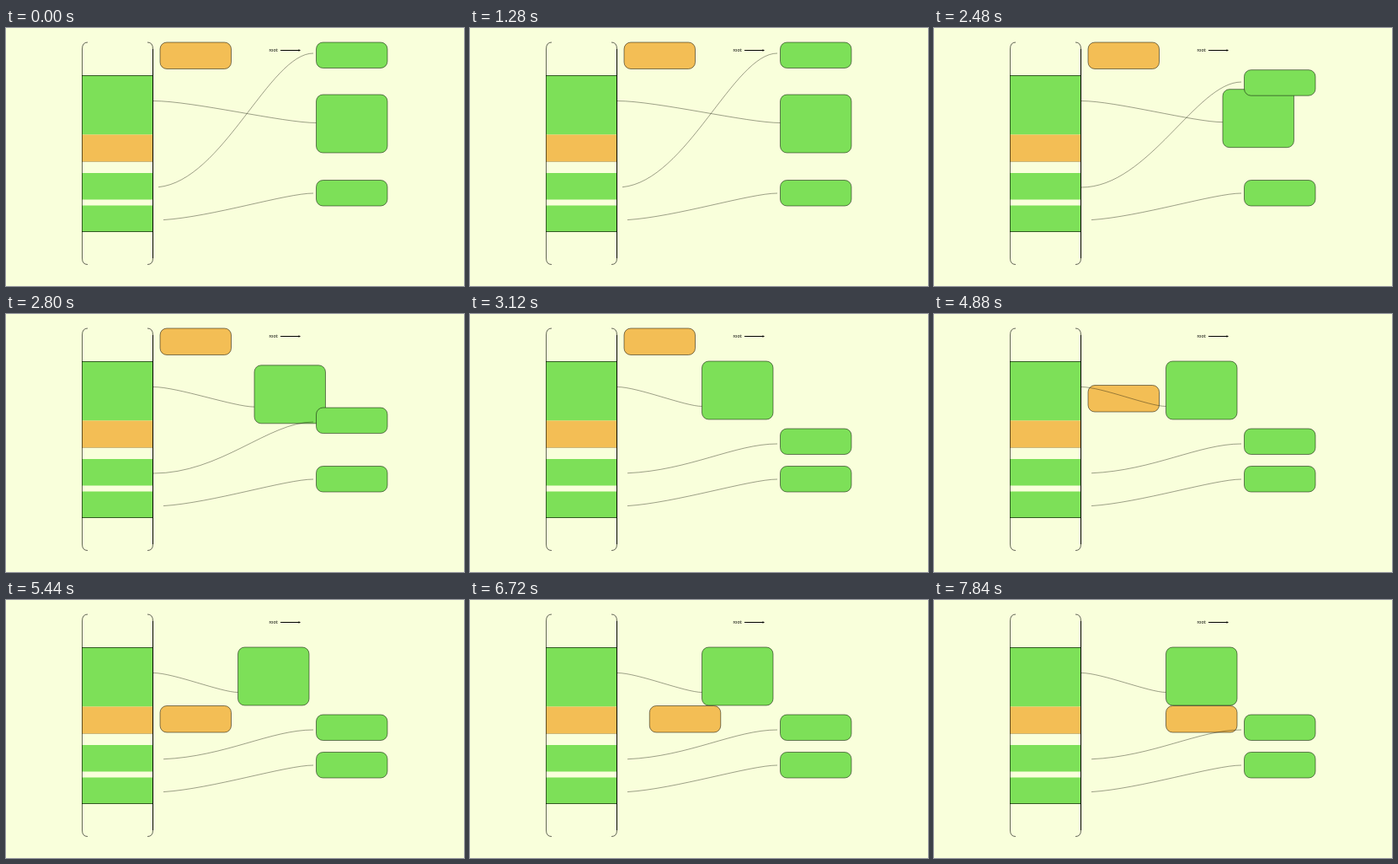
Recreate the animation shown at these times as an HTML page. Size 544 px wide and 306 px high, loop 8 s.

```html
<!DOCTYPE html>
<html lang="en">
<head>
<meta charset="utf-8">
<title>Heap blocks</title>
<style>
  html, body { margin: 0; width: 100%; height: 100%; overflow: hidden; background: #f9ffdb; }
  svg { display: block; width: 100vw; height: 100vh; }
  .green { fill: #7de058; }
  .orange { fill: #f3be55; }
  .block { stroke: #000; stroke-width: .5; }
  .line { fill: none; stroke: #000; stroke-width: .6; }
  .strong { stroke-width: 1; }
  .link { fill: none; stroke: #1c1c10; stroke-width: .42; }
  text { font: 5.5px "Liberation Sans", Arial, sans-serif; }
</style>
</head>
<body>
<svg viewBox="0 0 544 306">
  <rect width="544" height="306" fill="#f9ffdb"/>

  <g id="column">
    <rect class="green" x="90" y="56" width="85" height="70.5"/>
    <rect class="orange" x="90" y="126.5" width="85" height="32"/>
    <rect class="green" x="90" y="172" width="85" height="31.5"/>
    <rect class="green" x="90" y="210.5" width="85" height="31.5"/>
    <path class="line" d="M90 56.5H175M90 241.5H175"/>
    <path class="line" d="M90 158.5H175" opacity=".3"/>
    <path class="line" d="M97 17Q90.5 17 90.5 25V273Q90.5 280.5 97 280.5"/>
    <path class="line" d="M168 17Q174.5 17 174.5 25M174.5 273Q174.5 280.5 168 280.5"/>
    <path class="line strong" d="M174.5 25V273"/>
  </g>

  <text x="312.5" y="27.5">root:</text>
  <path class="line strong" d="M326 26.5H349"/>
  <path d="M347.5 25.2L350 26.5L347.5 27.8Z"/>

  <rect class="block green" id="large" width="84.5" height="69" rx="8"/>
  <rect class="block green" id="small" x="368.5" width="84.5" height="30.5" rx="8"/>
  <rect class="block green" x="368.5" y="180.5" width="84.5" height="30.5" rx="8"/>
  <rect class="block orange" id="fresh" width="84.5" height="31.5" rx="8"/>

  <path class="link" id="largeLink"/>
  <path class="link" id="smallLink"/>
  <path class="link" id="fixedLink"/>
</svg>
<script>
  const LOOP = 8000, STEP = 80, MOVE = 1000;
  const $ = id => document.getElementById(id);
  const lerp = (a, b, p) => a + (b - a) * p;

  // cubic-bezier(.42, 0, .58, 1), solved for x by bisection
  function ease(x) {
    if (x <= 0) return 0;
    if (x >= 1) return 1;
    let lo = 0, hi = 1;
    for (let i = 0; i < 24; i++) {
      const s = (lo + hi) / 2, r = 1 - s;
      if (1.26 * r * r * s + 1.74 * r * s * s + s ** 3 < x) lo = s; else hi = s;
    }
    return lo * lo * (3 - 2 * lo);
  }

  const progress = (t, start) => ease((t - start) / MOVE);

  function place(id, x, y) {
    $(id).setAttribute("x", x);
    $(id).setAttribute("y", y);
  }

  // Links leave the column at x = 175; bendOut and bendIn are the flat handles
  // as shares of the width, gap hides the first stretch.
  function link(id, y0, x1, y1, bendOut, bendIn, gap = 0) {
    const x0 = 175, w = x1 - x0;
    const path = $(id);
    path.setAttribute("d",
      `M${x0} ${y0}C${x0 + w * bendOut} ${y0} ${x1 - w * bendIn} ${y1} ${x1} ${y1}`);
    path.setAttribute("stroke-dasharray", `0 ${gap} 999`);
  }

  function render(t) {
    const shift = progress(t, 2117);
    const drop = progress(t, 4308);
    const slide = progress(t, 6323);

    const largeX = lerp(368.5, 275.5, shift);
    place("large", largeX, lerp(79, 56, shift));
    place("small", 368.5, lerp(17, 136, shift));
    place("fresh", lerp(183, 275.5, slide), lerp(17, 125.5, drop));

    const smallGap = t < 2240 ? 6 : t < 3040 ? 0 : 12;
    link("largeLink", 86.5, largeX, lerp(112.5, 109.5, shift), .24, .2);
    link("smallLink", 189, 365, lerp(30, 154, shift), .42, .28, smallGap);
    link("fixedLink", 228, 365, 196, .3, .18, 12);
  }

  const origin = performance.now();
  function tick() {
    const t = (performance.now() - origin) % LOOP;
    render(Math.floor(t / STEP) * STEP);
    requestAnimationFrame(tick);
  }
  tick();
</script>
</body>
</html>
```
